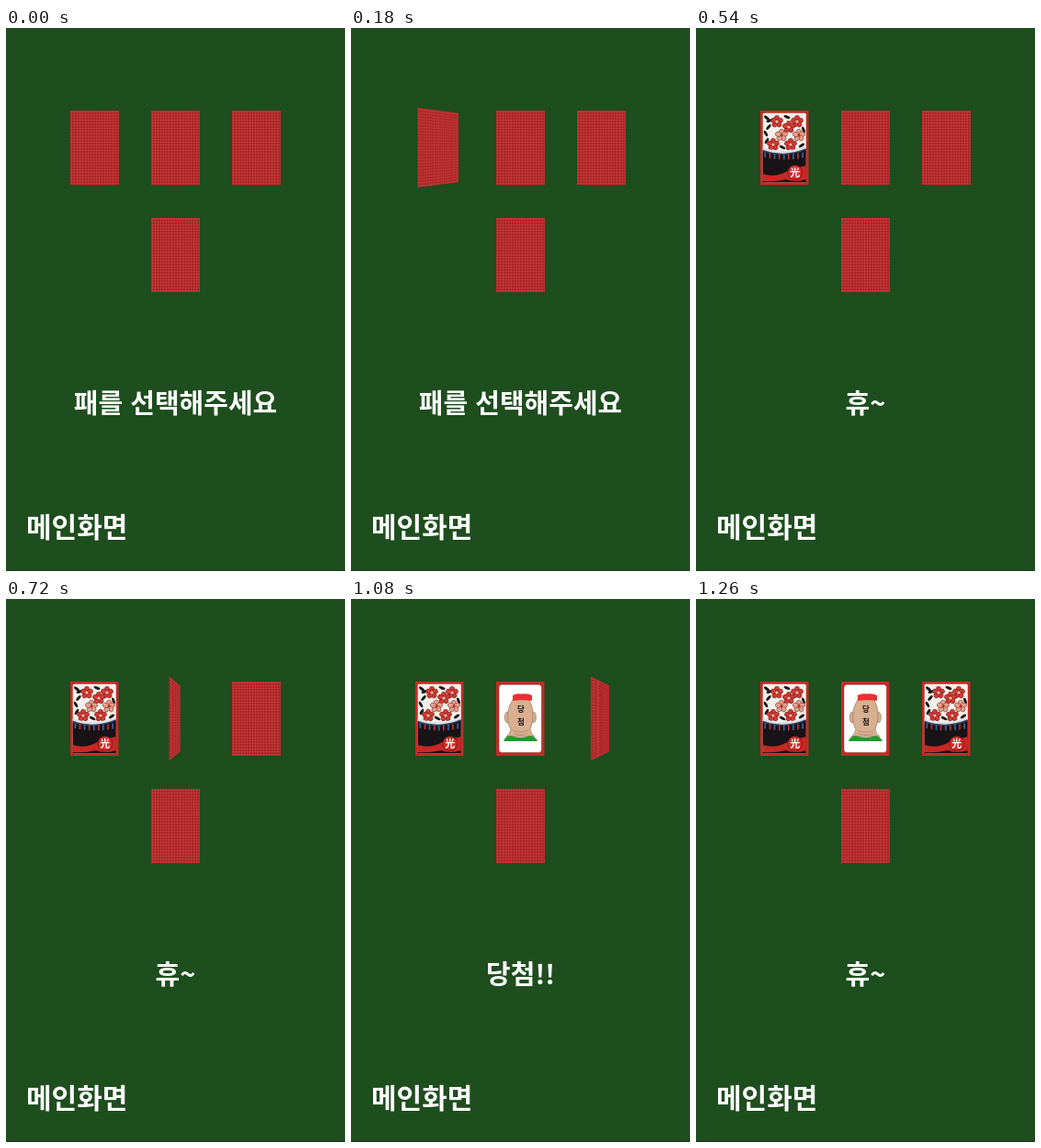
Recreate the animation shown at these times as an HTML page. Size 369 by 592 pixels, loop 1960 ms.

```html
<!DOCTYPE html>
<html lang="ko">
<head>
<meta charset="utf-8">
<title>패 선택</title>
<style>
  html, body { margin: 0; width: 100%; height: 100%; overflow: hidden; background: #1e4d1e; }
  #stage { position: relative; width: 369px; height: 592px; overflow: hidden; background: #1e4d1e; }
  #stage::after { content: ""; position: absolute; left: 0; bottom: 0; width: 100%; height: 1px; background: #173a18; }
  .card { position: absolute; width: 52.5px; height: 81px; transform-style: preserve-3d; }
  .face { position: absolute; inset: 0; overflow: hidden; backface-visibility: hidden; }
  .back {
    background:
      radial-gradient(circle, #cb4340 30%, transparent 60%) 0 0 / 3px 3px,
      #ab2426;
    box-shadow: inset 0 0 0 .6px #b8302f;
  }
  .front { transform: rotateY(180deg); }
  svg { display: block; }
  .labels { position: absolute; inset: 0; }
  text { font-family: "Noto Sans CJK KR", "Noto Sans CJK", "Noto Sans", sans-serif; }
  .labels text { fill: #fff; font-weight: 900; }
</style>
</head>
<body>
<div id="stage">
  <svg class="labels" width="369" height="592">
    <text id="message" x="184.5" y="419.5" font-size="29" text-anchor="middle"></text>
    <text x="22" y="555" font-size="30">메인화면</text>
  </svg>
</div>
<script>
const stage = document.getElementById("stage");
const message = document.getElementById("message");

const LOOP = 1960;
const ASK = "패를 선택해주세요", MISS = "휴~", WIN = "당첨!!";

// start time, angle of each top card, message
const STEPS = [
  [0, [0, 0, 0], ASK],
  [180, [33, 0, 0], ASK],
  [360, [112, 0, 0], MISS],
  [540, [180, 0, 0], MISS],
  [720, [180, 77, 0], MISS],
  [900, [180, 180, 0], WIN],
  [1080, [180, 180, 68], WIN],
  [1260, [180, 180, 180], MISS]
];

const svg = body =>
  `<svg width="52.5" height="81" viewBox="0 0 52.5 81"><rect width="52.5" height="81" fill="#c62a26"/>${body}</svg>`;

function flower(x, y, petal, core) {
  let out = "";
  for (let i = 0; i < 5; i++) {
    out += `<ellipse cy="-3.5" rx="2.7" ry="3.3" fill="${petal}" stroke="#5c1715" stroke-width=".45" transform="rotate(${i * 72})"/>`;
  }
  return `<g transform="translate(${x} ${y})">${out}<circle r="1.5" fill="${core}"/></g>`;
}

const leaf = (x, y, turn) =>
  `<ellipse rx="3.6" ry="1.5" fill="#1a1717" transform="translate(${x} ${y}) rotate(${turn})"/>`;

function blossomCard() {
  const leaves = [[7, 8, 40], [9, 18, -50], [6, 25, 60], [29, 7, 20], [47, 21, 70], [45, 38, -35], [24, 40, 30], [7, 33, -60], [10, 11, -20]];
  const reds = [[18, 12], [40, 12], [31, 18], [14, 37], [33, 37]];
  const pinks = [[23, 27], [42, 27]];
  let tassels = "";
  for (let i = 0; i < 9; i++) {
    const x = 4.5 + i * 5.1;
    const y = 46 + 3 * (1 - ((x - 26) / 24) ** 2);
    tassels += `<rect x="${x}" y="${y - 1.5}" width="1.7" height="6" fill="${i % 2 ? "#c42c30" : "#34639a"}"/>`;
  }
  return svg(`
    <rect x="2.7" y="2.7" width="47.1" height="75.6" rx="1.5" fill="#f4f0eb"/>
    ${leaves.map(l => leaf(...l)).join("")}
    ${reds.map(([x, y]) => flower(x, y, "#d13a34", "#f0c9b0")).join("")}
    ${pinks.map(([x, y]) => flower(x, y, "#e5a08c", "#b52c28")).join("")}
    <path d="M2.7 40Q26 49 49.8 38V46H2.7Z" fill="#dfe0e3"/>
    <path d="M2.7 43.5Q26 52 49.8 42V78.3H2.7Z" fill="#171317"/>
    <path d="M2.7 43.5Q26 52 49.8 42" fill="none" stroke="#2b456b" stroke-width="1.5"/>
    ${tassels}
    <path d="M2.7 69Q17 74 31 65L49.8 60V75Q38 79 28 75Q15 78 2.7 77Z" fill="#c92826"/>
    <circle cx="37.8" cy="67.5" r="8" fill="#d52a28" stroke="#231517" stroke-width=".5"/>
    <text x="37.8" y="71.6" font-size="11" font-weight="700" text-anchor="middle" fill="#fff">光</text>`);
}

function prizeCard() {
  const skin = `fill="#d8b091" stroke="#8b6a54" stroke-width=".6"`;
  return svg(`
    <rect x="3" y="3.2" width="46.5" height="74.3" rx="3.5" fill="#fff" stroke="#7d2220" stroke-width=".5"/>
    <ellipse cx="12" cy="39" rx="2.7" ry="6" ${skin}/>
    <ellipse cx="40.7" cy="39" rx="2.7" ry="6" ${skin}/>
    <path d="M18 20H36Q41 29 40 40Q39 48 37 52Q38 57 42 60H11Q15 57 16 52Q13 48 12.7 40Q12 29 18 20Z" ${skin}/>
    <path d="M18 53Q27 57 35 53M19 56.5Q27 60 35 56.5" fill="none" stroke="#a37d65" stroke-width=".6"/>
    <path d="M8 65Q10 59 16 59Q27 63 37 59Q43 60 45 65Z" fill="#219a2d"/>
    <path d="M18 21V15Q22 12.5 28 13.5Q34 12.5 39 15V21Q28 19 18 21Z" fill="#ef2e30"/>
    <g font-size="8.5" font-weight="700" text-anchor="middle" fill="#1c1512">
      <text x="27" y="33">당</text><text x="27" y="47">첨</text>
    </g>`);
}

function addCard(x, y, art) {
  const card = document.createElement("div");
  card.className = "card";
  card.style.left = x + "px";
  card.style.top = y + "px";
  card.innerHTML = `<div class="face back"></div><div class="face front">${art}</div>`;
  stage.append(card);
  return card;
}

const blossom = blossomCard();
const cards = [blossom, prizeCard(), blossom].map((art, i) => addCard(70 + 88.2 * i, 90, art));
addCard(158.2, 207, blossom);

let shown = null;
const start = performance.now();

function draw(now) {
  const t = Math.max(0, now - start) % LOOP;
  const step = STEPS.findLast(s => s[0] <= t);
  if (step !== shown) {
    shown = step;
    const [, angles, words] = step;
    cards.forEach((card, i) => {
      card.style.transform = angles[i] ? `perspective(206px) rotateY(${angles[i]}deg)` : "none";
    });
    message.textContent = words;
  }
  requestAnimationFrame(draw);
}
draw(start);
</script>
</body>
</html>
```
